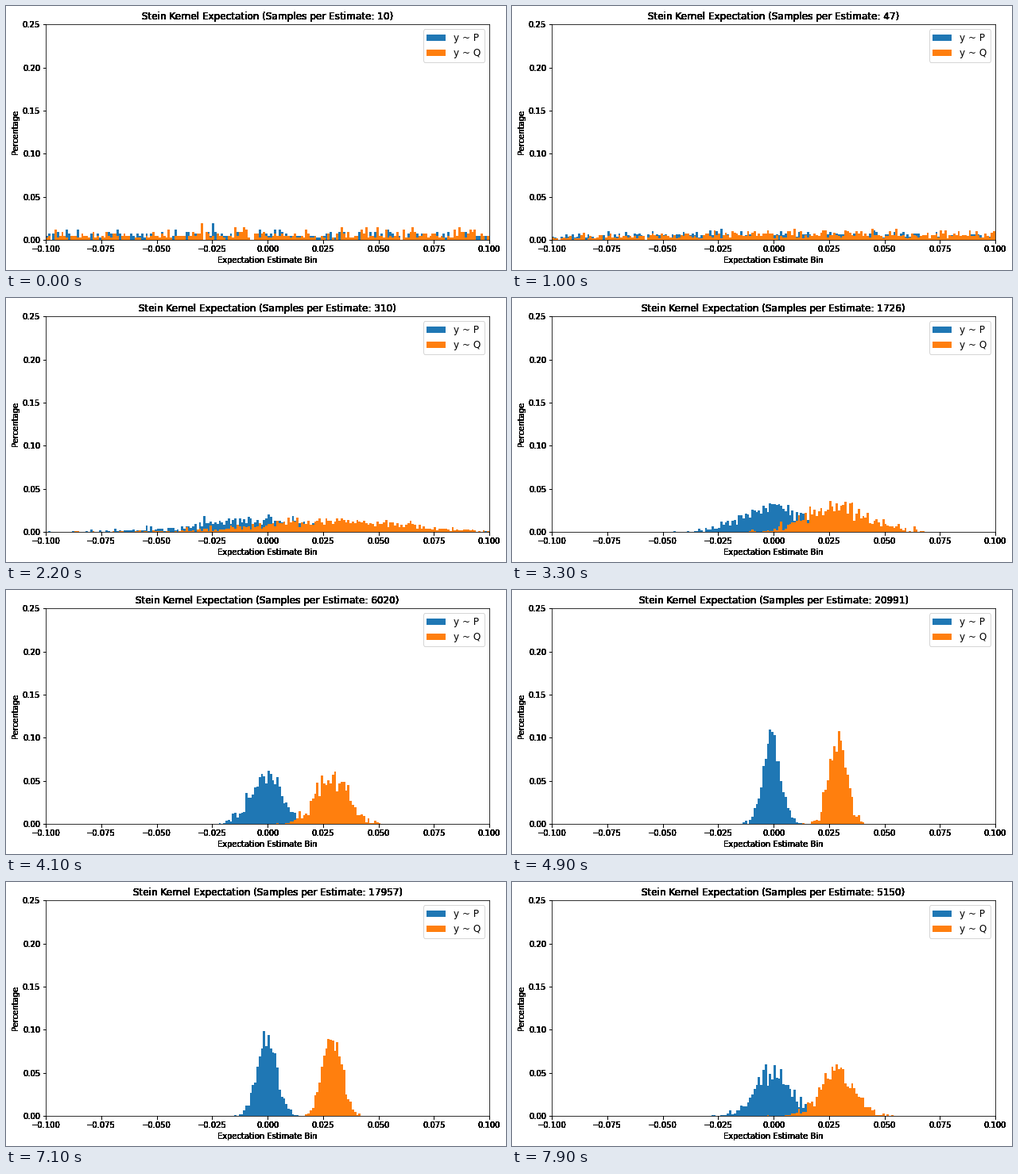
These frames come from a looping animation (629x333 px, 8 s). A matplotlib script:

```python
import numpy as np
import matplotlib.pyplot as plt
from matplotlib.animation import FuncAnimation
from matplotlib.patches import Rectangle

WIDTH, HEIGHT, DPI = 629, 333, 72
STEPS, FRAMES, INTERVAL = 60, 80, 100
ESTIMATES = 1000
SPREAD = 0.575                      # deviation of a single-sample estimate
SERIES = [("y ~ P", "C0", -0.0004), ("y ~ Q", "C1", 0.0291)]
EDGES = np.linspace(-0.1, 0.1, 201)

np.random.seed(7)
NOISE = np.random.normal(size=(STEPS, len(SERIES), ESTIMATES))

plt.rcParams["font.family"] = "DejaVu Sans"


def make_opaque(artist):
    """Draw repeatedly so antialiased edges become solid."""
    draw_once = artist.draw

    def draw(renderer):
        for _ in range(14):
            draw_once(renderer)

    artist.draw = draw


def sample_count(step):
    return int(10 ** (1 + 4 * step / (STEPS - 1)))


def bin_shares(step, series):
    """Share of the visible estimates that falls in each bin."""
    deviation = SPREAD / np.sqrt(sample_count(step))
    estimates = SERIES[series][2] + deviation * NOISE[step, series]
    counts, _ = np.histogram(estimates, EDGES)
    return counts / counts.sum()


fig = plt.figure(figsize=((WIDTH + 1e-6) / DPI, (HEIGHT + 1e-6) / DPI),
                 dpi=DPI, facecolor="white")
ax = fig.add_axes([50 / WIDTH, 38 / HEIGHT, 558 / WIDTH, 271.8 / HEIGHT])

bars = [ax.stairs(np.zeros(200), EDGES, fill=True, facecolor=color,
                  edgecolor="none", linewidth=0)
        for _, color, _ in SERIES]

ax.set_xlim(-0.1, 0.1)
ax.set_ylim(0, 0.25)
ax.set_xticks(np.linspace(-0.1, 0.1, 9))
ax.set_yticks(np.linspace(0, 0.25, 6))
ax.set_xlabel("Expectation Estimate Bin")
ax.set_ylabel("Percentage")
title = ax.set_title("", fontsize=12)
ax.legend([Rectangle((0, 0), 1, 1, facecolor=color, edgecolor="none")
           for _, color, _ in SERIES],
          [label for label, _, _ in SERIES], loc="upper right", fontsize=12)

for artist in (title, ax.xaxis.label, ax.yaxis.label):
    make_opaque(artist)
for tick in ax.xaxis.get_major_ticks() + ax.yaxis.get_major_ticks():
    make_opaque(tick.label1)
    make_opaque(tick.tick1line)


def update(frame):
    # Sample size grows to its peak, then runs back down.
    step = min(frame, 2 * STEPS - 1 - frame)
    for series, patch in enumerate(bars):
        patch.set_data(bin_shares(step, series))
    title.set_text("Stein Kernel Expectation "
                   f"(Samples per Estimate: {sample_count(step)})")
    return [*bars, title]


anim = FuncAnimation(fig, update, frames=FRAMES, interval=INTERVAL,
                     init_func=lambda: update(0), repeat=True,
                     repeat_delay=0, blit=False)
plt.show()
```
